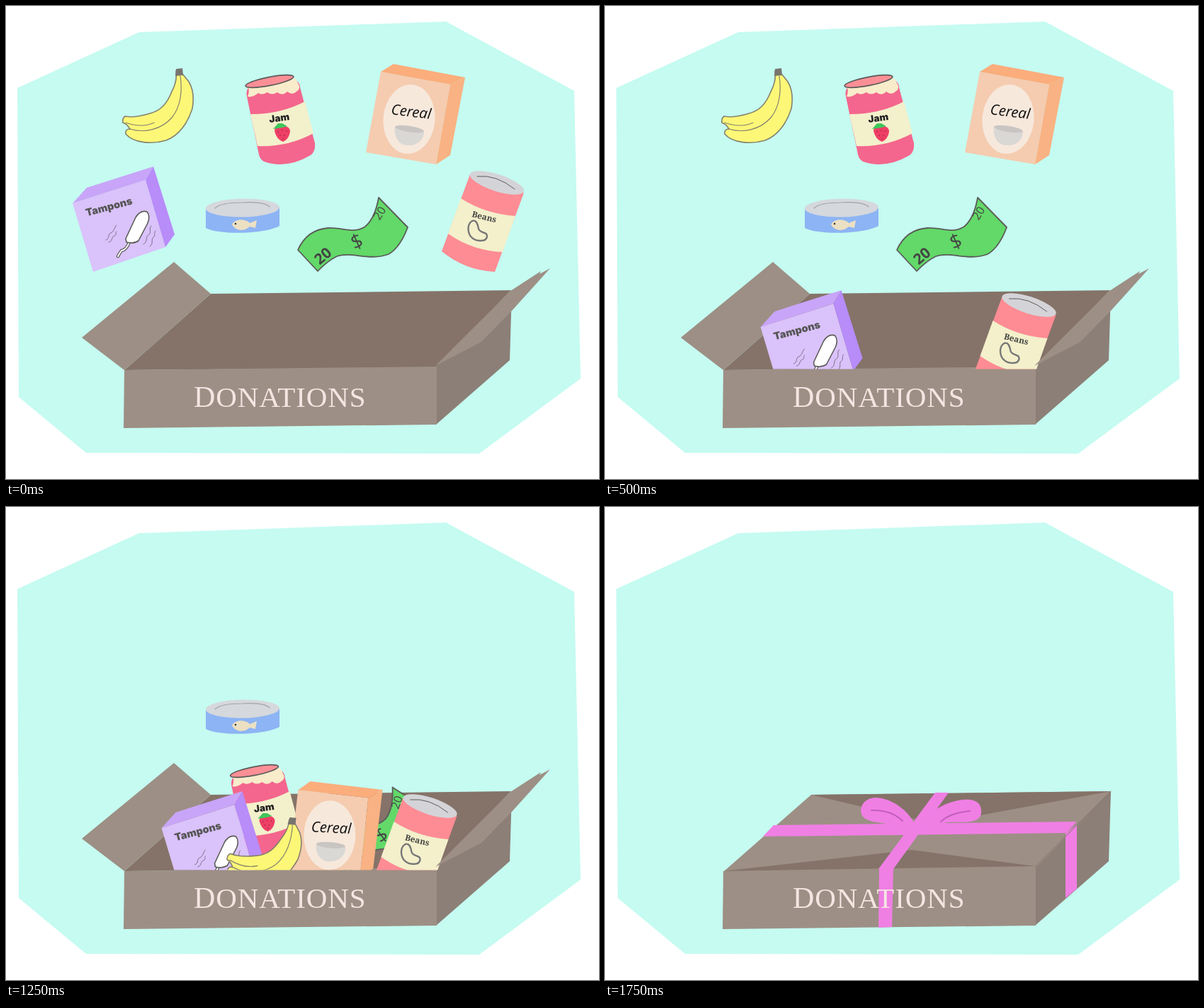
These frames come from a looping animation (837x669 px, 2000 ms). An HTML page:

```html
<!DOCTYPE html>
<html lang="en">
<head>
<meta charset="utf-8">
<title>Donations</title>
<style>
  html, body { margin: 0; width: 100%; height: 100%; overflow: hidden; background: #fff; }
  svg { display: block; width: 100%; height: 100%; }
  .line { fill: none; stroke: #5b5b58; stroke-linecap: round; stroke-linejoin: round; }
  .card { fill: #9d8f85; }
  .shade { fill: #857369; }
  .side { fill: #8c7f77; }
  .pink { fill: #f07fe4; }
  .heavy { font-family: Inter, "Liberation Sans", sans-serif; font-weight: 900; }
  .hand { font-family: "Open Sans", Lato, sans-serif; }
  .title { font: 41px "Liberation Serif", serif; letter-spacing: .9px; fill: #f5e5e2; }
</style>
</head>
<body>
<svg viewBox="0 0 837 669">
  <clipPath id="rim"><path d="M0 0H837V513.5H0Z"/></clipPath>
  <path fill="#c5fbf1" d="M16 116 188 37 621 22 802 120 811 527 668 633 113 632 18 553Z"/>

  <g id="back">
    <path class="shade" d="M289 407 713 402 608 511 167 515Z"/>
    <path class="card" d="M237 362 289 407 167 515 107 469Z"/>
  </g>
  <path class="side" d="M607 510 714 402 711 501 607 592Z"/>
  <path class="card" d="M167 515 608 510 608 592 166 597Z"/>

  <g id="items" clip-path="url(#rim)">
    <g id="money">
      <path class="line" style="fill:#62d968" stroke-width="1.8" d="M412 345Q425 316 455 314C476 313 490 323 507 312Q521 300 526 271L567 313Q556 342 540 351C514 361 488 347 467 354Q453 361 440 375Z"/>
      <g class="hand" fill="#444" text-anchor="middle">
        <text font-size="21" font-weight="700" transform="translate(452 359) rotate(-40)">20</text>
        <text font-size="28" transform="translate(499 342) rotate(-24)">$</text>
        <text font-size="16" font-weight="500" transform="translate(532 296) rotate(-58)">20</text>
      </g>
    </g>

    <g id="beans">
      <path fill="#fd8c94" d="M655 238 615 347Q648 374 690 376L731 264Z"/>
      <path fill="#f3f0cb" d="M642 272Q676 294 719 297L701 348Q658 346 624 322Z"/>
      <ellipse cx="693" cy="250" rx="40" ry="12" transform="rotate(18 693 250)" fill="#d4d4d8"/>
      <path class="line" d="M665 241Q692 238 718 259"/>
      <text transform="translate(657 298) rotate(14)" font-family="Noto Serif, serif" font-size="11.7" font-weight="600" fill="#444">Beans</text>
      <path class="line" style="stroke:#777" stroke-width="2.4" d="M658 304C651 308 651 319 656 326C663 334 678 334 679 326C680 319 669 322 667 315C666 309 664 302 658 304Z"/>
    </g>

    <g id="jam">
      <path fill="#f4668d" d="M340 128Q338 119 343 115L408 105Q415 108 415 115L436 194Q437 206 430 211Q396 231 364 220Q358 216 357 210Z"/>
      <path fill="#f8eccb" d="M342 115 408 102 412 109Q417 117 410 121Q404 127 397 121Q390 128 383 122Q375 127 369 122Q361 127 356 123Q348 130 341 128Q344 121 342 115Z"/>
      <path fill="#f3f0cc" d="M345 153Q388 153 422 135L434 180Q397 200 355 198Z"/>
      <ellipse class="line" style="fill:#fb8f96" stroke-width="1.7" cx="372" cy="106.5" rx="34.5" ry="6" transform="rotate(-11 372 106.5)"/>
      <text class="heavy" font-size="13.5" transform="translate(372 165) rotate(-8)" fill="#222">Jam</text>
      <path fill="#ee3f66" d="M379 177Q379 169 390 170Q401 169 401 178Q399 189 391 192Q382 189 379 177Z"/>
      <path fill="#3fc65a" d="M377 174 384 166 390 166 397 170 390 172Z"/>
      <path class="line" style="stroke:#8c2038" stroke-width="1.5" d="M384 178h0M390 176h0M396 177h0M387 183h0M393 183h0M391 188h0"/>
    </g>

    <g id="cereal">
      <path fill="#f5ccb0" d="M529 93 627 111 607 224 508 207Z"/>
      <path fill="#fbad7c" d="M529 93 547 82 648 101 627 111Z"/>
      <path fill="#f9b283" d="M627 111 648 101 627 211 607 224Z"/>
      <ellipse cx="569" cy="160" rx="36.5" ry="49" transform="rotate(5 569 160)" fill="#f7e8dc"/>
      <text class="hand" font-size="20.5" font-style="italic" font-weight="500" transform="translate(543 153) rotate(7)" fill="#111">Cereal</text>
      <path fill="#dad8d5" d="M549 171C547 183 553 197 567 197C582 198 590 188 590 178Z"/>
      <ellipse cx="569.5" cy="174" rx="20.5" ry="4.2" transform="rotate(9 569.5 174)" fill="#c8c5c2"/>
    </g>

    <g id="tampons">
      <path fill="#dac2fa" d="M94 279 197 246 225 341 123 376Z"/>
      <path fill="#c8a5f8" d="M94 279 114 257 208 227 197 246Z"/>
      <path fill="#b88cf9" d="M197 246 208 227 238 323 225 341Z"/>
      <text class="heavy" font-size="14.5" transform="translate(114 297.5) rotate(-15)" fill="#555">Tampons</text>
      <path class="line" stroke-width="4.5" d="M174 334Q170 345 163 346Q160 350 158 354"/>
      <path class="line" style="stroke:#fff" stroke-width="2" d="M174 334Q170 345 163 346Q160 350 158 354"/>
      <path class="line" style="fill:#fff" stroke-width="1.6" d="M169 329 183 299Q190 288 199 291Q204 297 200 307L187 332Q180 337 170 334Z"/>
      <path class="line" style="stroke:#78708a" d="M141 331C147 329 143 323 148 321S152 314 156 310M145 334C151 333 148 327 153 325S153 321 156 319M194 337C201 333 196 327 201 324S201 315 205 311M203 340C209 336 204 330 208 327S208 322 211 318"/>
    </g>

    <g id="banana">
      <path class="line" style="fill:#fdf777;stroke:#85816f" stroke-width="1.6" d="M240 92Q242 106 234 121C227 139 218 148 203 152C190 156 178 158 168 156Q164 159 165 165Q171 167 175 174Q168 174 169 181C180 194 206 196 226 190C245 183 257 164 263 145Q267 122 258 107L249 96Z"/>
      <path class="line" style="stroke:#85816f" stroke-width="1.2" d="M175 174C195 180 219 175 234 158C247 142 249 119 246 99M169 165Q192 173 209 165"/>
      <path fill="#77756e" d="M240 89 249 88 250 98 239 99Z"/>
    </g>

    <g id="can">
      <path fill="#8db4f4" d="M282 287V314C300 324 365 323 386 311V285Z"/>
      <ellipse cx="334" cy="285.5" rx="52" ry="13" transform="rotate(-1 334 285)" fill="#d5d8dc"/>
      <path class="line" style="stroke:#a0a2a6" stroke-width="1.2" d="M295 286Q303 278 333 278Q364 276 372 284"/>
      <path fill="#ece0c2" d="M319 309C323 301 337 300 344 307L354 303 352 314 344 312C337 319 324 319 319 309Z"/>
      <circle cx="324" cy="308" r="1.3" fill="#333"/>
    </g>
  </g>

  <path id="flap" class="card" d="M606 509 712 403 755 375 753 379 768 371 714 431 671 475Z"/>

  <g id="lid">
    <path class="card" d="M291 407 714 402 607 511 167 516Z"/>
    <path class="shade" d="M291 407 714 402 465 448ZM167 515 433 485 607 508Z"/>
    <path class="pink" d="M238 450 666 445 651 461 223 466ZM650 462 666 449 666 540 650 553ZM466 404 485 404 407 512 386 512ZM387 510 407 510 405 594 386 595Z"/>
    <path class="pink" d="M437 448C427 428 403 411 381 411C363 412 357 429 364 438C374 449 405 445 437 458ZM438 458C451 437 475 417 505 414C525 412 532 420 531 433C529 449 505 445 483 446Z"/>
    <path class="line" style="stroke:#c05fb8" stroke-width="2" d="M376 429Q404 428 420 444M474 445Q488 432 515 430"/>
    <path class="line" style="stroke:#857369" d="M607 509 714 402"/>
  </g>

  <text class="title" x="265" y="567"><tspan font-size="42">D</tspan>ONATIONS</text>
</svg>
<script>
  const STEP = 250, STEPS = 8, CLOSE = 7;
  const byId = id => document.getElementById(id);

  // Step at which each item lands in the box, and where it lands.
  const drops = {
    tampons: [1, 'translate(125.5 175)'],
    beans: [2, 'translate(-94.5 173)'],
    cereal: [3, 'translate(-113 304) rotate(-4 574 148)'],
    jam: [4, 'translate(-21.5 267)'],
    banana: [4, 'translate(160 351) rotate(11.5 245 91)'],
    money: [5, 'translate(19.5 125.5) rotate(-13 526 271)'],
    can: [6, 'translate(137 204)']
  };

  const show = (id, on) => byId(id).setAttribute('display', on ? 'inline' : 'none');

  function draw(time) {
    const step = Math.floor(time / STEP) % STEPS;
    for (const [id, [at, place]] of Object.entries(drops))
      byId(id).setAttribute('transform', step >= at ? place : 'translate(0 0)');
    for (const id of ['back', 'items', 'flap']) show(id, step < CLOSE);
    show('lid', step >= CLOSE);
  }

  const start = performance.now();
  function loop() {
    draw(performance.now() - start);
    requestAnimationFrame(loop);
  }
  loop();
</script>
</body>
</html>
```
